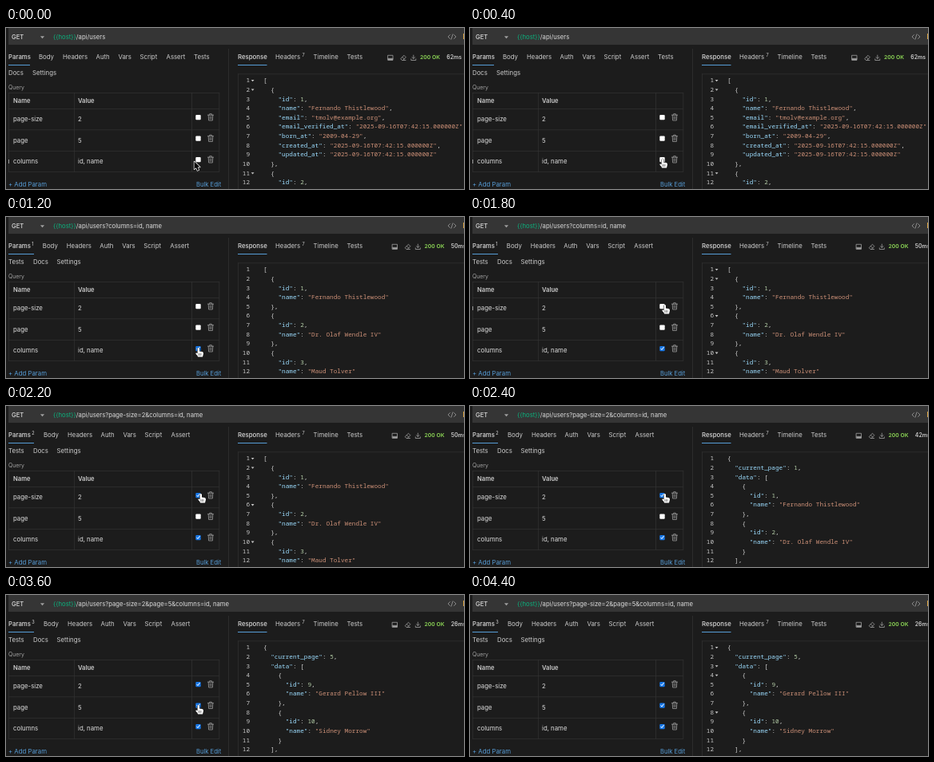
An HTML page with a canvas for the animation above (4.6 s loop, 573 by 202 pixels).

```html
<!DOCTYPE html>
<html lang="en">
<head>
<meta charset="utf-8">
<title>API client</title>
<style>
html, body { margin: 0; width: 100%; height: 100%; overflow: hidden; background: #1c1c1c; }
canvas { display: block; width: 573px; height: 202px; }
</style>
</head>
<body>
<canvas id="stage"></canvas>
<script>
const W = 573, H = 202, LOOP = 4600, STEP = 200;
const canvas = document.getElementById('stage');
const ctx = canvas.getContext('2d');
const dpr = window.devicePixelRatio || 1;
canvas.width = W * dpr;
canvas.height = H * dpr;

const UI = 'Inter, sans-serif';
const MONO = '"Noto Sans Mono", monospace';
const CHAR = 4.62, LINE = 11.63;
const C = {
  bg: '#1c1c1c', bar: '#353535', border: '#333333', text: '#cccccc', dim: '#a0a0a0',
  bright: '#dcdcdc', amber: '#d9a342', green: '#0bb27e', ok: '#8cd656', link: '#569cd6',
  key: '#9cdcfe', string: '#ce9178', number: '#b5cea8', gutter: '#c8c8c8', check: '#1677e8'
};

// Click and reply times of the three switches.
const CLICK = { columns: 600, size: 2000, page: 3400 };
const REPLY = { columns: 1200, size: 2400, page: 3600 };
const FOLD_DELAY = 200;

const rows = [
  { name: 'page-size', value: '2', y: 114, click: CLICK.size, hover: 1400 },
  { name: 'page', value: '5', y: 140.5, click: CLICK.page, hover: 2800 },
  { name: 'columns', value: 'id, name', y: 167, click: CLICK.columns, hover: 0 }
];

// Pointer: start time, shape, x, y.
const pointer = [
  [0, 'arrow', 235.5, 167.5], [200, 'hand', 240.8, 164],
  [1400, 'hand', 243.8, 114], [1600, 'hand', 243.8, 110],
  [2800, 'hand', 241.8, 133], [3000, 'hand', 240.8, 138], [4400, 'none', 0, 0]
];

const stamp = '"2025-09-16T07:42:15.000000Z"';
const person = (pad, id, name) =>
  [pad + '{', `${pad}  "id": ${id},`, `${pad}  "name": "${name}"`, pad + '},'];
const first = 'Fernando Thistlewood', second = 'Dr. Olaf Wendle IV';

function paged(page, a, b) {
  const list = [...person('    ', ...a), ...person('    ', ...b)];
  list[7] = '    }';
  return ['{', `  "current_page": ${page},`, '  "data": [', ...list, '  ],',
    '  "first_page_url": "http://localhost/api/users?page=1",'];
}

const replies = [
  { at: 0, ms: '62ms', shift: 0, lines: [
    '[', '  {', '    "id": 1,', `    "name": "${first}",`,
    '    "email": "tmolv@example.org",', `    "email_verified_at": ${stamp},`,
    '    "born_at": "2009-04-29",', `    "created_at": ${stamp},`,
    `    "updated_at": ${stamp}`, '  },', '  {', '    "id": 2,', `    "name": "${second}",`] },
  { at: REPLY.columns, ms: '50ms', shift: 5.5, lines: ['[',
    ...person('  ', 1, first), ...person('  ', 2, second), ...person('  ', 3, 'Maud Tolver')] },
  { at: REPLY.size, ms: '42ms', shift: 5.5, lines: paged(1, [1, first], [2, second]) },
  { at: REPLY.page, ms: '26ms', shift: 5.5,
    lines: paged(5, [9, 'Gerard Pellow III'], [10, 'Sidney Morrow']) }
];

function text(str, x, mid, color = C.text, size = 7.8, weight = 400) {
  ctx.font = `${weight} ${size}px ${UI}`;
  ctx.fillStyle = color;
  ctx.fillText(str, x, mid + size * 0.36);
  return ctx.measureText(str).width;
}

function rect(x, y, w, h, color) {
  ctx.fillStyle = color;
  ctx.fillRect(x, y, w, h);
}

function stroke(d, x, y, color = C.dim, width = 0.8) {
  ctx.save();
  ctx.translate(x, y);
  ctx.strokeStyle = color;
  ctx.lineWidth = width;
  ctx.lineCap = ctx.lineJoin = 'round';
  ctx.stroke(new Path2D(d));
  ctx.restore();
}

function triangle(x, y, r, color) {
  ctx.fillStyle = color;
  ctx.beginPath();
  ctx.moveTo(x - r, y - r / 2);
  ctx.lineTo(x + r, y - r / 2);
  ctx.lineTo(x, y + r * 0.7);
  ctx.fill();
}

function drawUrl(t) {
  rect(3, 0, W - 3, 21, C.bar);
  text('GET', 7, 11, C.bright, 7.6, 500);
  triangle(45.5, 11.5, 2.6, C.dim);
  const query = [];
  if (t >= CLICK.size) query.push('page-size=2');
  if (t >= CLICK.page) query.push('page=5');
  if (t >= CLICK.columns) query.push('columns=id, name');
  const x = 59 + text('{{host}}', 59, 11, C.green, 7.7);
  text('/api/users' + (query.length ? '?' + query.join('&') : ''), x, 11, C.bright, 7.7);
  stroke('M-2.6 -2.4L-5 0L-2.6 2.4M2.6 -2.4L5 0L2.6 2.4M1 -3.2L-1 3.2', 558, 11);
  rect(572, 7, 1, 7, C.amber);
}

function drawTabs(t) {
  const count = rows.filter(r => t >= r.click).length;
  const names = ['Body', 'Headers', 'Auth', 'Vars', 'Script', 'Assert'];
  const xs = [41, 71, 112.5, 140.5, 167.5, 200.5];
  const shift = [0, 4.8, 6, 6][count];
  text('Params', 3, 36.5, C.bright, 7.8, 500);
  if (count) text(String(count), 32.3, 34, C.bright, 5.6);
  rect(3, 46, count ? 32 : 27, 1, C.link);
  names.forEach((name, i) => text(name, xs[i] + shift, 36.5));
  const rest = count ? [['Tests', 3, 56], ['Docs', 34, 56], ['Settings', 63.5, 56]]
    : [['Tests', 235, 36.5], ['Docs', 3, 56], ['Settings', 33, 56]];
  for (const tab of rest) text(...tab);
}

function drawCheck(x, y, on) {
  ctx.fillStyle = on ? C.check : '#ffffff';
  ctx.beginPath();
  ctx.roundRect(x - 3.2, y - 3.2, 6.4, 6.4, 1);
  ctx.fill();
  if (on) stroke('M-1.7 0.1L-0.5 1.5L1.8 -1.7', x, y, '#ffffff', 1);
}

function drawTable(t) {
  text('Query', 3, 75, C.dim, 6.9);
  for (const y of [81, 101, 127.5, 154, 180]) rect(3, y, 264, 0.7, C.border);
  for (const x of [3, 85, 232, 266.5]) rect(x, 81, 0.7, 99.5, C.border);
  text('Name', 9, 91.5, C.text, 7.6, 600);
  text('Value', 90, 91.5, C.text, 7.6, 600);
  for (const row of rows) {
    text(row.name, 9, row.y + 0.5, C.bright);
    text(row.value, 90, row.y + 0.5, C.bright);
    drawCheck(240.5, row.y - 1.9, t >= row.click);
    stroke('M-3.6 -2.8H3.6M-1.3 -2.8V-4.3H1.3V-2.8M-2.8 -2.8L-2.4 4H2.4L2.8 -2.8M-0.9 -1V2.3M0.9 -1V2.3',
      256, row.y - 2, C.dim, 0.75);
    if (t >= row.hover && t < row.click) rect(3, row.y - 2, 1, 5, C.dim);
  }
  text('+ Add Param', 3, 196.5, C.link);
  text('Bulk Edit', 238, 196.5, C.link, 7.6);
}

function drawCode(lines, folds) {
  const kinds = [C.key, C.string, C.number, '#d4d4d4'];
  ctx.font = `500 7.7px ${MONO}`;
  lines.forEach((line, i) => {
    const y = 68.3 + i * LINE;
    ctx.fillStyle = C.gutter;
    ctx.textAlign = 'right';
    ctx.fillText(i + 1, 305, y);
    ctx.textAlign = 'left';
    for (const m of line.matchAll(/("[^"]*"(?=:))|("[^"]*")|(\d+)|([^"\d]+)/g)) {
      ctx.fillStyle = kinds[m.slice(1).findIndex(Boolean)];
      ctx.fillText(m[0], 322 + m.index * CHAR, y);
    }
    if (folds && /[[{]$/.test(line)) triangle(308.6, y - 2.4, 1.9, C.gutter);
  });
}

function drawResponse(t) {
  const reply = replies.findLast(r => t >= r.at);
  const s = reply.shift;
  rect(278, 26, 0.8, H - 26, C.border);
  text('Response', 290, 36.5, C.bright, 7.8, 500);
  rect(290, 46, 36.5, 1, C.link);
  text('Headers', 337, 36.5);
  text('7', 370.4, 34, C.text, 5.6);
  text('Timeline', 384.5, 36.5);
  text('Tests', 426.5, 36.5);
  stroke('M-3 -3H3V3H-3ZM-3 1H3', 481 + s, 37.3);
  rect(478 + s, 38.4, 6, 2, C.dim);
  stroke('M-3 1L1 -3L3.4 -0.6L-0.4 3.2H-1.2ZM-1.2 -0.8L1.3 1.7M-0.4 3.2H3', 497 + s, 37.3);
  stroke('M0 -3.2V1M-1.8 -0.7L0 1.1L1.8 -0.7M-3 1.5V3.2H3V1.5', 509.8 + s, 37.3);
  text('200 OK', 518 + s, 37, C.ok, 6.8, 600);
  text(reply.ms, 551.3 + s, 37, C.text, 6.9, 600);
  rect(290, 57.5, W - 290, 0.7, C.border);
  rect(290, 57.5, 0.7, H - 57.5, C.border);
  drawCode(reply.lines, !reply.at || t >= reply.at + FOLD_DELAY);
}

function drawPointer(t) {
  const [, shape, x, y] = pointer.findLast(p => t >= p[0]);
  if (shape === 'none') return;
  const hand = shape === 'hand';
  const path = new Path2D(hand
    ? 'M-1.2 1Q0 -0.8 1.2 1V4.4L4.7 5.1Q6.4 5.5 6.2 7.4L5.2 11.4H-0.6Q-1.4 9.5 -3.4 7.7Q-3.6 5.9 -1.2 7.1Z'
    : 'M0 0V9.8L2.3 7.8L4 11.4L5.8 10.6L4.2 7.1H7.2Z');
  ctx.save();
  ctx.translate(x, y);
  ctx.lineJoin = 'round';
  ctx.lineWidth = hand ? 0.9 : 1.4;
  ctx.strokeStyle = hand ? '#111111' : '#ffffff';
  ctx.fillStyle = hand ? '#ffffff' : '#080808';
  ctx.stroke(path);
  ctx.fill(path);
  if (hand) stroke('M1.6 7.2V9.7M3.2 7.4V9.7M0 7.2V9.7', 0, 0, '#222222', 0.5);
  ctx.restore();
}

function draw(t) {
  ctx.setTransform(dpr, 0, 0, dpr, 0, 0);
  rect(0, 0, W, H, C.bg);
  drawUrl(t);
  drawTabs(t);
  drawTable(t);
  drawResponse(t);
  drawPointer(t);
}

const start = performance.now();
function tick() {
  const t = (performance.now() - start) % LOOP;
  draw(Math.floor(t / STEP) * STEP);
  requestAnimationFrame(tick);
}
tick();
</script>
</body>
</html>
```
